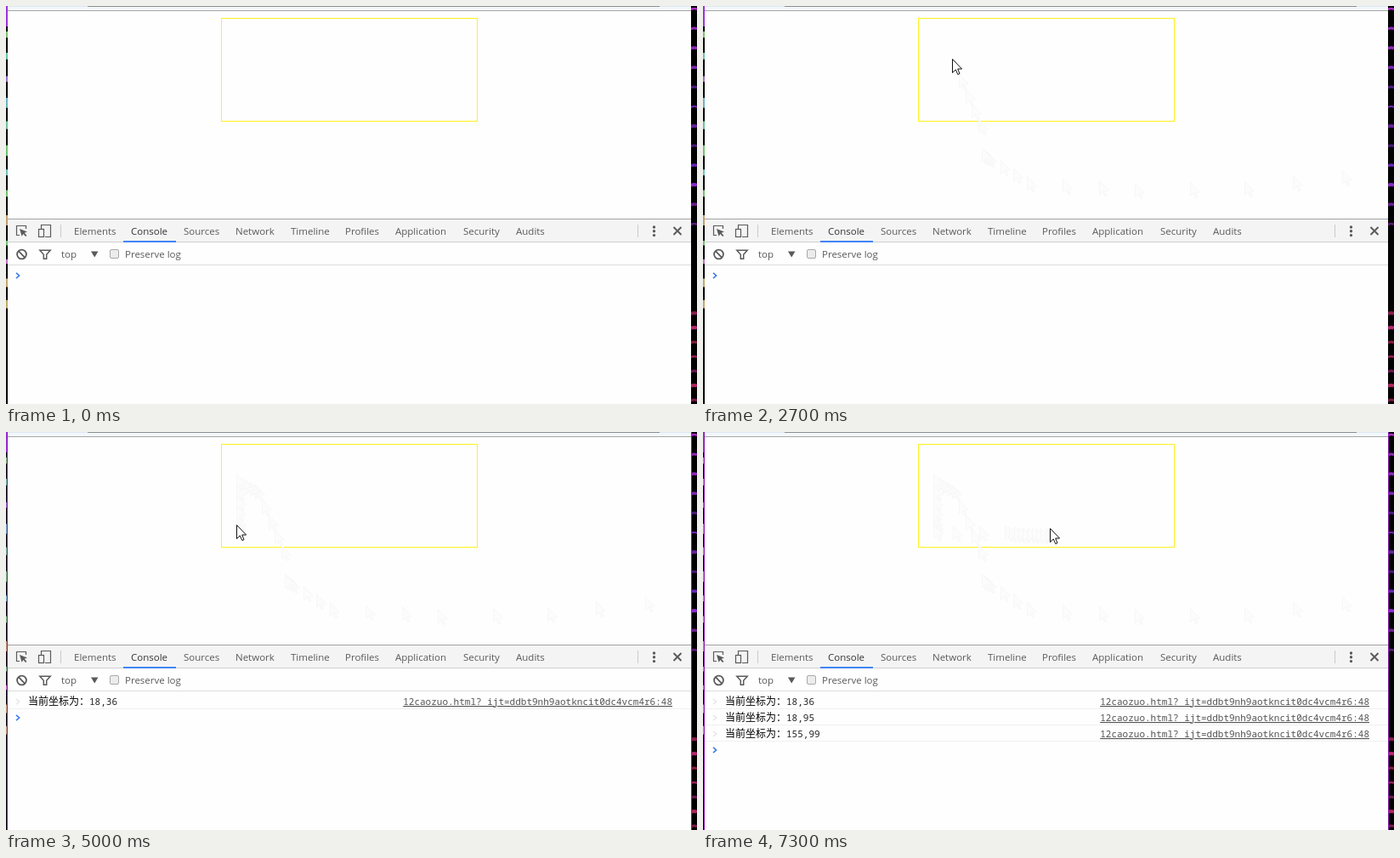
Write an HTML page that moves like this. It is 813 px wide and 468 px high and loops after 8000 ms.

```html
<!DOCTYPE html>
<html lang="zh">
<head>
<meta charset="utf-8">
<style>
  html, body { margin: 0; width: 100%; height: 100%; overflow: hidden; background: #000; }
  svg { display: block; }
  text { font: 11.5px "Open Sans", "Noto Sans", sans-serif; fill: #5a5a5a; white-space: pre; }
  .log text { font: 11px "Noto Sans Mono", monospace; fill: #222; }
  .log .cjk { font: 12px "Noto Sans CJK SC", "Noto Sans CJK", sans-serif; fill: #000; }
  .log .link { fill: #545454; text-decoration: underline; text-decoration-skip-ink: none; }
  .icon { fill: none; stroke: #5a5a5a; stroke-width: 1.5; }
  .chevron { fill: none; stroke-width: 1.6; }
</style>
</head>
<body>
<svg width="813" height="468" viewBox="0 0 813 468">
  <defs>
    <path id="arrow" d="M.5.5V16.5L4.3 12.9 6.8 18.5 9 17.6 6.7 12H11.6Z"/>
    <path id="chevron" class="chevron" d="M12 313.8L15.6 317 12 320.2"/>
  </defs>
  <rect width="813" height="468"/>
  <g id="sides" fill="none"></g>
  <rect width="2" height="24" fill="#9a35d8"/>
  <path id="rim" d="M1.5 0V468M806.5 0V468" stroke="#8a1bb0"/>
  <rect x="2" width="804" height="468" fill="#fefefe"/>

  <rect x="2" width="804" height="5" fill="#f3f7fb"/>
  <path d="M2 .5H806" stroke="#dce8f4"/>
  <path d="M96 .5H769" stroke="#8d8d8d"/>
  <path d="M2 5.5H806" stroke="#a5a5a5"/>
  <rect x="253.5" y="14.5" width="301" height="121" fill="none" stroke="#fff01e"/>

  <rect x="2" y="250" width="804" height="27" fill="#f4f4f5"/>
  <path d="M2 250.5H806" stroke="#a3a3a3"/>
  <path d="M2 277.5H806" stroke="#cfcfcf"/>
  <path d="M2 304.5H806" stroke="#dcdcdc"/>
  <path d="M138 277H200" stroke="#4285f4" stroke-width="2"/>
  <path d="M64.5 257V272M743.5 257V272" stroke="#cacaca"/>
  <g id="tabs"></g>

  <g class="icon">
    <path d="M16 269.5H12.5V258.5H23.5V262" stroke-width="1.2"/>
    <path d="M16 262L25 265.5 21.7 266.8 24.5 270 23 271 20.4 268 18.6 270.8Z" fill="#5a5a5a" stroke="none"/>
    <path d="M41.5 262V257.5H52.5V271.5H46" stroke-width="1.2"/>
    <rect x="38.5" y="262.5" width="6" height="9" stroke-width="1.2"/>
    <path d="M785.5 260L794.5 269M794.5 260L785.5 269" stroke-width="2"/>
    <circle cx="18.5" cy="292" r="5.4" stroke-width="1.8"/>
    <path d="M14.8 288.2L22.2 295.8" stroke-width="1.8"/>
    <path d="M39.8 287.2H52.2L47.7 292.2V297.2H44.3V292.2Z"/>
    <path d="M100 288.5H108.5L104.2 295.5Z" fill="#5a5a5a" stroke="none"/>
    <rect x="122.5" y="286.5" width="10" height="10" rx="1.5" fill="#ececec" stroke="#a9a9a9" stroke-width="1"/>
    <path d="M762.5 260V270" stroke-width="3.4" stroke-linecap="round" stroke-dasharray="0 4.8"/>
  </g>
  <text x="65" y="296">top</text>
  <text x="140" y="296">Preserve log</text>

  <g id="logs"></g>
  <use id="prompt" href="#chevron" stroke="#3b7be8"/>
  <svg id="trail" width="806" height="468" fill="#fcfcfc" stroke="#f7f7f8"></svg>
  <use id="cursor" href="#arrow" fill="#fff" stroke="#111"/>
</svg>
<script>
const LOOP = 8000, STEP = 100, REPAINT = 3300;
const $ = id => document.getElementById(id);
const show = (el, on) => el.setAttribute('visibility', on ? 'visible' : 'hidden');
const add = (parent, markup) => {
  $(parent).insertAdjacentHTML('beforeend', markup);
  return $(parent).lastElementChild;
};

let seed = 7;
const random = () => (seed = seed * 16807 % 2147483647) / 2147483647;

// Key points of the cursor path: time, x, y
const path = [
  [800, 809, 186], [1100, 637, 206], [1300, 508, 208], [1600, 381, 200], [1700, 381, 200],
  [2000, 334, 171], [2200, 328, 167], [2300, 324, 133], [2700, 293, 62], [3100, 271, 50],
  [4000, 271, 50], [4400, 271, 98], [4600, 271, 105], [4800, 271, 105], [5000, 271, 109],
  [5800, 271, 109], [5900, 294, 110], [6100, 355, 110], [6400, 371, 112], [7100, 408, 113]
];

function cursorAt(t) {
  const next = path.findIndex(key => key[0] > t);
  if (next < 0) return path.at(-1).slice(1);
  const [t0, ...from] = path[next - 1], [t1, ...to] = path[next];
  return from.map((v, i) => Math.round(v + (to[i] - v) * (t - t0) / (t1 - t0)));
}

// The cursor moves once per STEP and leaves a faint trace wherever it has been.
const steps = [];
for (let time = path[0][0]; time <= path.at(-1)[0]; time += STEP) {
  const [x, y] = cursorAt(time), last = steps.at(-1);
  if (last && last.x === x && last.y === y) continue;
  steps.push({ time, x, y, ghost: add('trail', `<use href="#arrow" x="${x}" y="${y}"/>`) });
}

const tabs = { Elements: 80, Console: 147, Sources: 209, Network: 270, Timeline: 335, Profiles: 399,
  Application: 458, Security: 538, Audits: 600 };
for (const [name, x] of Object.entries(tabs))
  add('tabs', `<text x="${x}" y="269"${name === 'Console' ? ' style="fill:#333"' : ''}>${name}</text>`);

const logs = [[3300, '18,36'], [5200, '18,95'], [7300, '155,99']].map(([time, point], i) => ({
  time,
  el: add('logs', `<g class="log" transform="translate(0 ${i * 19})">
    <use href="#chevron" stroke="#e9e9e9"/>
    <text class="cjk" x="26" y="321">当前坐标为：</text>
    <text x="98" y="321">${point}</text>
    <text class="link" x="784" y="321" text-anchor="end">12caozuo.html?_ijt=ddbt9nh9aotkncit0dc4vcm4r6:48</text>
    <path d="M2 325.5H806" stroke="#f0f0f0"/></g>`)
}));

// Slivers of the desktop beside the window
function streaks(count, top, gap, hue) {
  for (let i = 0; i < count; i++) {
    const y = top + i * gap;
    add('sides', `<path d="M806 ${y + 1}Q810 ${y - 1} 813 ${y + 1}"
      stroke="hsl(${hue - random() * 25} 65% ${25 + random() * 25}%)" stroke-width="${2 + random() * 2}"/>`);
  }
}
streaks(12, 3, 23, 290);
streaks(7, 361, 17, 345);
for (let y = 30; y < 370; y += 20 + random() * 12)
  add('sides', `<path d="M1 ${y}v${5 + random() * 8}" stroke="hsl(${random() * 300} 40% 60%)" stroke-width="2"/>`);

function draw(now) {
  const t = now % LOOP;
  const current = steps.findLast(s => s.time <= t);
  for (const s of steps) show(s.ghost, s.time <= t && s !== current);
  show($('cursor'), current);
  if (current) $('cursor').setAttribute('transform', `translate(${current.x} ${current.y})`);

  for (const log of logs) show(log.el, log.time <= t);
  $('prompt').setAttribute('y', 19 * logs.filter(log => log.time <= t).length);
  show($('rim'), t >= REPAINT);
  requestAnimationFrame(draw);
}
requestAnimationFrame(draw);
</script>
</body>
</html>
```
